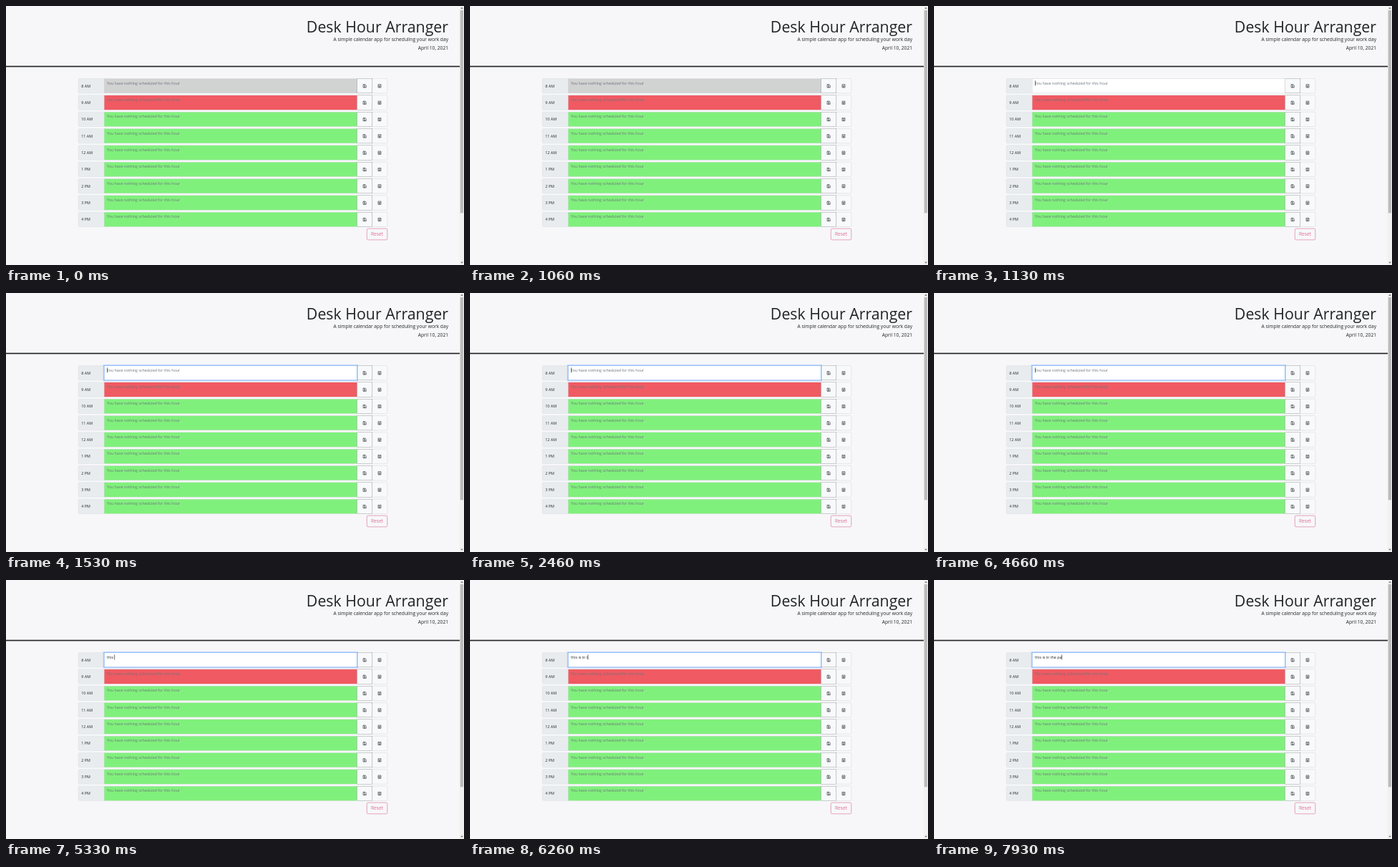
An HTML page for the animation above (8 s loop, 640 px wide and 362 px high).

```html
<!DOCTYPE html>
<html lang="en">
<head>
<meta charset="utf-8">
<title>Day planner</title>
<style>
  html, body { margin: 0; width: 100%; height: 100%; overflow: hidden; background: #f7f7f9; }
  svg { display: block; width: 640px; height: 362px; }
  text { font: 16px "Open Sans", "Noto Sans", sans-serif; fill: #212529; white-space: pre; }
  .title { font-size: 64px; }
  .lead { font-size: 20px; }
  .right { text-anchor: end; }
  .hint { fill: #6c757d; }
  .icon { fill: none; stroke: #4b5157; stroke-width: 2; }
</style>
</head>
<body>
<svg id="stage" viewBox="0 0 1920 1086">
  <rect width="1920" height="1086" fill="#f7f7f9"/>
  <g class="right">
    <text class="title" x="1854" y="110">Desk Hour Arranger</text>
    <text class="lead" x="1854" y="148">A simple calendar app for scheduling your work day</text>
    <text class="lead" x="1854" y="184">April 10, 2021</text>
  </g>
  <rect y="251" width="1902" height="5" fill="#212529"/>
  <g id="rows"></g>
  <rect x="1513" y="933.5" width="85.5" height="47" rx="5" fill="none" stroke="#de7a9e" stroke-width="2"/>
  <text class="lead" x="1530" y="964" style="fill:#de6e96">Reset</text>
  <rect x="1902" width="18" height="1086" fill="#f1f1f1"/>
  <rect x="1904" y="18" width="13" height="850" fill="#bcbcbc"/>
  <path d="M1906 11l5-6 5 6zM1906 1073l5 6 5-6z" fill="#606060"/>
  <g id="editor">
    <rect id="field" x="411.5" y="304.5" width="1060" height="61" fill="#fff" stroke="#ced4da"/>
    <g id="glow" fill="none">
      <rect x="409" y="302" width="1065" height="66" stroke="#0d6efd" stroke-opacity=".25" stroke-width="4"/>
      <rect x="411.5" y="304.5" width="1060" height="61" stroke="#86b7fe" stroke-width="2"/>
    </g>
    <text id="hint" class="hint" x="423" y="329">You have nothing scheduled for this hour</text>
    <text id="entry" x="423" y="329" xml:space="preserve"></text>
    <rect id="caret" y="313" width="2" height="21" fill="#212529"/>
  </g>
</svg>
<script>
const LOOP = 8000, FOCUS = 1130, BLINK = 500, FADE = 150;
const TEXT = "this is in the pa";
const KEYS = [4800, 4860, 5000, 5130, 5260, 5400, 5530, 5660, 5860,
              5930, 6060, 6260, 6600, 7000, 7400, 7860, 7930];
const RESTARTS = [FOCUS, 2660, ...KEYS]; // each one makes the caret solid again
const HOURS = ["8 AM", "9 AM", "10 AM", "11 AM", "12 AM", "1 PM", "2 PM", "3 PM", "4 PM"];
const $ = id => document.getElementById(id);

const box = (x, y, w, fill, stroke, rx = 0) =>
  `<rect x="${x + .5}" y="${y + .5}" width="${w - 1}" height="61" rx="${rx}" fill="${fill}" stroke="${stroke}"/>`;

const row = (hour, i) => {
  const y = 304 + 70 * i;
  const fill = ["#d1d2d2", "#f05a62"][i] || "#80f07c";
  return box(303, y, 109, "#e9ecef", "#ced4da", 4) +
    box(411, y, 1061, fill, "#ced4da") +
    box(1535, y, 64, "#f8f9fa", "#c3c6c9", 4) +
    box(1472, y, 64, "#f8f9fa", "#6c757d") +
    `<text x="316" y="${y + 37}">${hour}</text>
     <text class="hint" x="423" y="${y + 25}">You have nothing scheduled for this hour</text>
     <path class="icon" d="M1497 ${y + 25}h9l4 4v9h-13zM1500 ${y + 25}v4h5v-4M1501 ${y + 33}h5v4h-5z"/>
     <path class="icon" d="M1560 ${y + 25}h12v13h-12zM1560 ${y + 29}h12M1563 ${y + 33}h6v3h-6z"/>`;
};
$("rows").innerHTML = HOURS.map(row).join("");

const ease = p => p * p * (3 - 2 * p);

function draw(now) {
  const t = now % LOOP;
  const focused = t >= FOCUS;
  $("editor").style.display = focused ? "" : "none";
  if (focused) {
    const typed = KEYS.filter(k => k <= t).length;
    const last = RESTARTS.filter(k => k <= t).pop();
    const entry = $("entry");
    entry.textContent = TEXT.slice(0, typed);
    $("hint").style.display = typed ? "none" : "";
    $("glow").style.opacity = ease(Math.min(1, (t - FOCUS) / FADE));
    $("caret").setAttribute("x", 423 + (typed ? entry.getComputedTextLength() : 0));
    $("caret").style.opacity = Math.floor((t - last) / BLINK) % 2 ? 0 : 1;
  }
  requestAnimationFrame(draw);
}
draw(performance.now());
</script>
</body>
</html>
```
